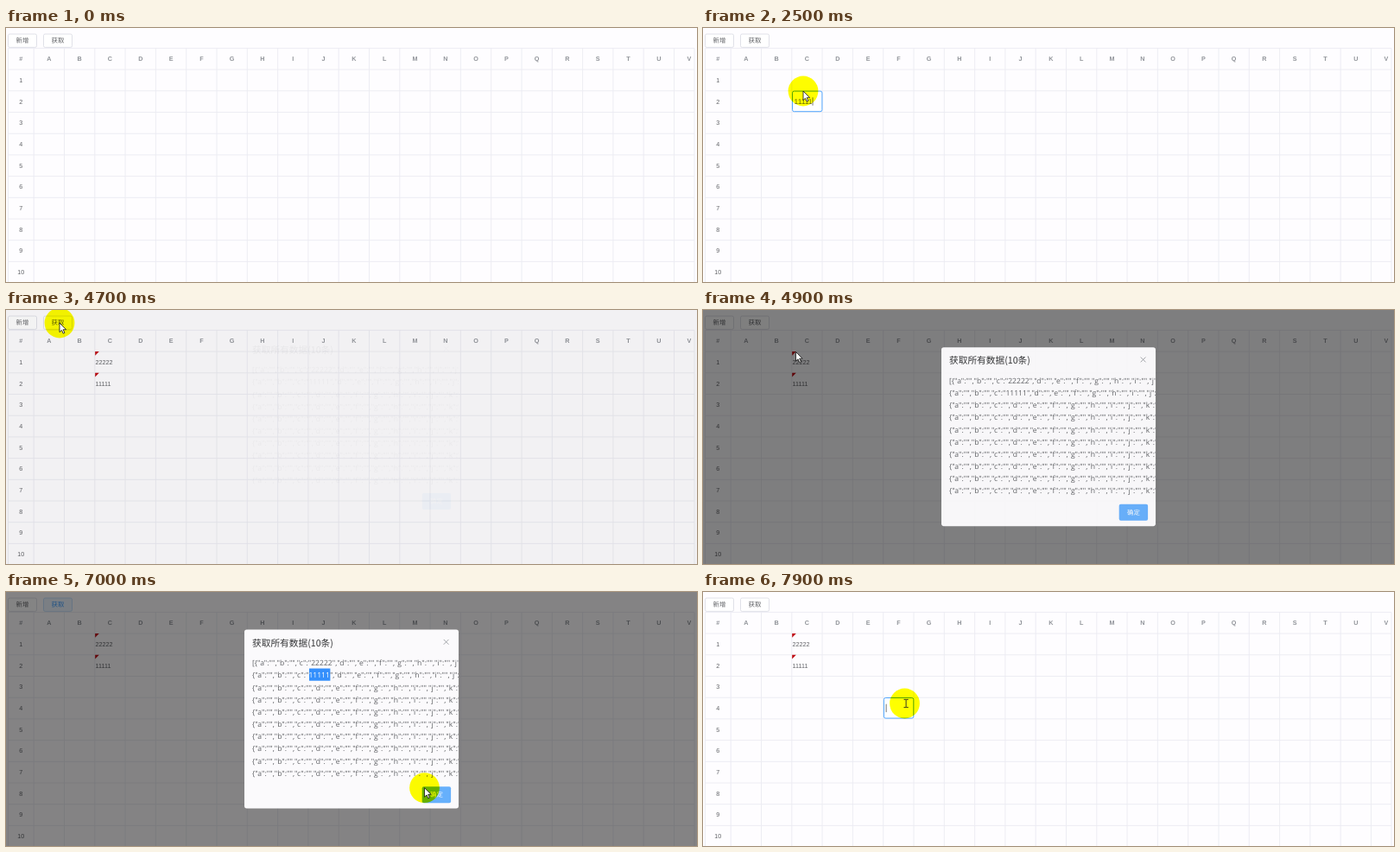
An HTML page that plays this animation: 800x294 px, repeating every 8 s.

```html
<!DOCTYPE html>
<html lang="zh">
<head>
<meta charset="utf-8">
<style>
  html, body { margin: 0; width: 100%; height: 100%; overflow: hidden; background: #fefdff; }
  svg { display: block; width: 800px; height: 294px; text-rendering: geometricPrecision; }
  text { white-space: pre; }
  .ui { font-family: "Liberation Sans", "Noto Sans CJK SC", "Noto Sans CJK", sans-serif; }
  .title { font-family: "Noto Sans CJK SC", "Noto Sans CJK", sans-serif; }
  .json { font-family: "Open Sans", "Noto Sans", sans-serif; }
</style>
</head>
<body>
<svg id="stage" viewBox="0 0 800 294"></svg>
<script>
const LOOP = 8000, STEP = 100;
const COL0 = 32.2, COL = 35.3, ROW0 = 23.4, ROW = 24.7;
const letters = [...'ABCDEFGHIJKLMNOPQRSTUV'];
const stage = document.getElementById('stage');

function add(parent, tag, attrs, content) {
  const el = document.createElementNS('http://www.w3.org/2000/svg', tag);
  for (const key in attrs) el.setAttribute(key, attrs[key]);
  if (content) el.textContent = content;
  parent.append(el);
  return el;
}
const set = (el, attrs) => { for (const key in attrs) el.setAttribute(key, attrs[key]); };
const show = (el, on) => el.setAttribute('visibility', on ? 'visible' : 'hidden');

// Text centred vertically on y
function label(parent, x, y, str, size, fill, more = {}) {
  return add(parent, 'text', { x, y: y + size * 0.36, 'font-size': size, fill, class: 'ui', ...more }, str);
}
const middle = { 'text-anchor': 'middle' };
const colX = c => COL0 + c * COL;
const rowY = r => ROW0 + r * ROW;

// Toolbar
function toolButton(x, str) {
  const box = add(stage, 'rect', { x, y: 7, width: 33, height: 15.4, rx: 1.8, 'stroke-width': 0.8 });
  const text = label(stage, x + 16.5, 14.6, str, 7.4, '', middle);
  return active => {
    set(box, { fill: active ? '#ecf5ff' : '#fff', stroke: active ? '#b9dafc' : '#d9dae2' });
    set(text, { fill: active ? '#409eff' : '#606266' });
  };
}
toolButton(2.5, '新增')(false);
const setFetch = toolButton(43.5, '获取');

// Grid
let lines = `M2.5 294V${ROW0}H797V294`;
for (let r = 1; r <= 10; r++) lines += `M2.5 ${rowY(r)}H797`;
letters.forEach((_, c) => lines += `M${colX(c)} ${ROW0}V294`);
add(stage, 'path', { d: lines, fill: 'none', stroke: '#ebebf2', 'stroke-width': 0.9 });
const head = { ...middle, 'font-weight': 'bold' };
label(stage, 17.3, 35.4, '#', 7.2, '#909399', head);
letters.forEach((ch, c) => label(stage, c === 21 ? 790.8 : colX(c) + COL / 2, 35.4, ch, 7.2, '#909399', head));
for (let r = 1; r <= 10; r++) label(stage, 17.3, rowY(r) + 12.2, String(r), 7.2, '#606266', middle);

// Editable cells
function cell(c, r, str, from, to, keys) {
  const x = colX(c) + 0.4, y = rowY(r), mid = y + 12.2;
  const done = add(stage, 'g');
  add(done, 'path', { d: `M${x} ${y}h4.6l-4.6 4.6z`, fill: '#c00d14' });
  label(done, x + 0.4, mid, str, 7.2, '#606266');
  const edit = add(stage, 'g');
  add(edit, 'rect', { x: x + 0.3, y: y + 0.3, width: 34.4, height: 23.6, rx: 2, fill: '#fff', stroke: '#409eff', 'stroke-width': 0.9 });
  const typed = label(edit, x + 2.4, mid, '', 8.4, '#606266');
  const caret = add(edit, 'rect', { y: mid - 4.7, width: 0.8, height: 9.4, fill: '#555' });
  return t => {
    const count = keys.filter(k => t >= k).length;
    const lastKey = count ? keys[count - 1] : from;
    show(edit, t >= from && t < to);
    show(done, t >= to);
    typed.textContent = str.slice(0, count);
    caret.setAttribute('x', x + 2.6 + (count ? typed.getComputedTextLength() : 0));
    caret.setAttribute('opacity', (t - lastKey) % 1060 < 530 ? 1 : 0);
  };
}
const cells = [
  cell(2, 2, '11111', 1300, 2700, [1700, 1800, 1900, 2000, 2200]),
  cell(2, 1, '22222', 2700, 4660, [3300, 3400, 3600, 3700, 3800]),
  cell(5, 4, '', 7500, 9000, [])
];

// Message box
const overlay = add(stage, 'rect', { width: 800, height: 294, fill: '#000' });
const dialog = add(stage, 'g');
add(add(stage, 'clipPath', { id: 'body' }), 'rect', { x: 276, y: 72, width: 248, height: 150 });
add(dialog, 'rect', { x: 276, y: 43.8, width: 248, height: 207, rx: 2.8, fill: '#fefdff' });
label(dialog, 285, 59, '获取所有数据(10条)', 10.7, '#303133', { class: 'title' });
add(dialog, 'path', { d: 'M506.7 55.2l5.8 5.8m0-5.8l-5.8 5.8', stroke: '#909399', 'stroke-width': 0.8 });
const body = add(dialog, 'g', { 'clip-path': 'url(#body)' });

const jsonRow = value => '{' + letters.map(ch => `"${ch.toLowerCase()}":"${ch === 'C' ? value : ''}"`).join() + '},';
const picks = [];
for (let i = 0; i < 10; i++) {
  const value = ['22222', '11111'][i] || '';
  const str = (i ? '' : '[') + jsonRow(value);
  const y = 82.4 + i * 14.18;
  const font = { class: 'json' };
  if (!value) {
    label(body, 285, y, str, 8.59, '#606266', font);
    continue;
  }
  const back = add(body, 'rect', { x: i ? 351 : 353.8, y: y - 7.8, width: 24.4, height: 14.2, fill: '#3390ff' });
  const [before, after] = str.split(value);
  const text = label(body, 285, y, '', 8.59, '#606266', font);
  add(text, 'tspan', {}, before);
  const mark = add(text, 'tspan', {}, value);
  add(text, 'tspan', {}, after);
  picks.push(on => {
    show(back, on);
    mark.setAttribute('fill', on ? '#fff' : '#606266');
  });
}
const confirm = add(dialog, 'rect', { x: 481.7, y: 225.4, width: 33.4, height: 19, rx: 2 });
label(dialog, 498.5, 235, '确定', 7.4, '#fff', { ...middle, 'font-weight': 500 });

// Pointer
const halo = add(stage, 'circle', { r: 17.4, fill: '#ff0', style: 'mix-blend-mode:multiply' });
const arrow = add(stage, 'path', {
  d: 'M0 0V10.6L2.5 8.3L4.2 12.2L5.9 11.4L4.2 7.7H7.6Z',
  fill: '#fff', stroke: '#111', 'stroke-width': 0.8, 'stroke-linejoin': 'round'
});
const beam = add(stage, 'path', {
  d: 'M-1 -4.6H1.1Q1.6 -4.6 1.6 -4V4Q1.6 4.6 1.1 4.6H-1M4.2 -4.6H2.1Q1.6 -4.6 1.6 -4M1.6 4Q1.6 4.6 2.1 4.6H4.2',
  fill: 'none', stroke: '#222', 'stroke-width': 0.9
});
const path = [
  [100, 101.5, 111.5], [900, 113.5, 85], [2200, 113.5, 85], [2500, 116, 73],
  [2800, 117.5, 66], [3900, 117.5, 66], [4300, 75.5, 36.5], [4500, 62, 15],
  [4700, 62, 15], [4900, 107.5, 48.5], [5200, 366, 85.5], [5900, 366, 86],
  [6200, 368.5, 98.5], [6500, 368.5, 98.5], [6800, 498, 233], [6950, 498, 233],
  [7100, 446, 208.5], [7500, 233.5, 129], [LOOP, 233.5, 129]
];
const beamTimes = [[1300, 2500], [2700, 4100], [5200, 6600], [7500, LOOP]];
const within = (t, a, b) => t >= a && t < b;
const clamp = v => Math.max(0, Math.min(1, v));

function pointerAt(t) {
  let i = 0;
  while (i < path.length - 2 && t >= path[i + 1][0]) i++;
  const [a, x0, y0] = path[i], [b, x1, y1] = path[i + 1];
  const p = clamp((t - a) / (b - a)), k = p * p * (3 - 2 * p);
  return [x0 + (x1 - x0) * k, y0 + (y1 - y0) * k];
}

// CSS "ease": cubic-bezier(.25, .1, .25, 1)
function ease(p) {
  p = clamp(p);
  let lo = 0, hi = 1;
  for (let i = 0; i < 20; i++) {
    const s = (lo + hi) / 2;
    const x = 0.75 * s * (1 - s) * (1 - s) + 0.75 * s * s * (1 - s) + s * s * s;
    if (x < p) lo = s; else hi = s;
  }
  return 0.3 * lo * (1 - lo) * (1 - lo) + 3 * lo * lo * (1 - lo) + lo * lo * lo;
}

function render(t) {
  cells.forEach(update => update(t));
  setFetch(within(t, 4400, 4660) || within(t, 6990, 7500));

  const opened = 4680, closed = 6990;
  const level = ms => t < closed ? ease((t - opened) / ms) : 1 - ease((t - closed) / ms);
  const fade = level(300);
  overlay.setAttribute('opacity', 0.5 * level(200));
  set(dialog, { opacity: fade, transform: `translate(0 ${-14 * (1 - fade)})` });
  show(dialog, fade > 0);
  picks[0](within(t, 5600, 6100));
  picks[1](t >= 6200);
  confirm.setAttribute('fill', within(t, 5500, 6700) ? '#409eff' : '#66b1ff');

  const [x, y] = pointerAt(t);
  const onText = beamTimes.some(([a, b]) => within(t, a, b));
  const at = `translate(${x} ${y})`;
  for (const el of [halo, arrow, beam]) el.setAttribute('transform', at);
  show(halo, t >= 100 && !within(t, 4850, 5000));
  show(arrow, t >= 100 && !onText);
  show(beam, onText);
}

const start = performance.now();
function frame() {
  const t = (performance.now() - start) % LOOP;
  render(Math.floor(t / STEP) * STEP);
  requestAnimationFrame(frame);
}
frame();
</script>
</body>
</html>
```
